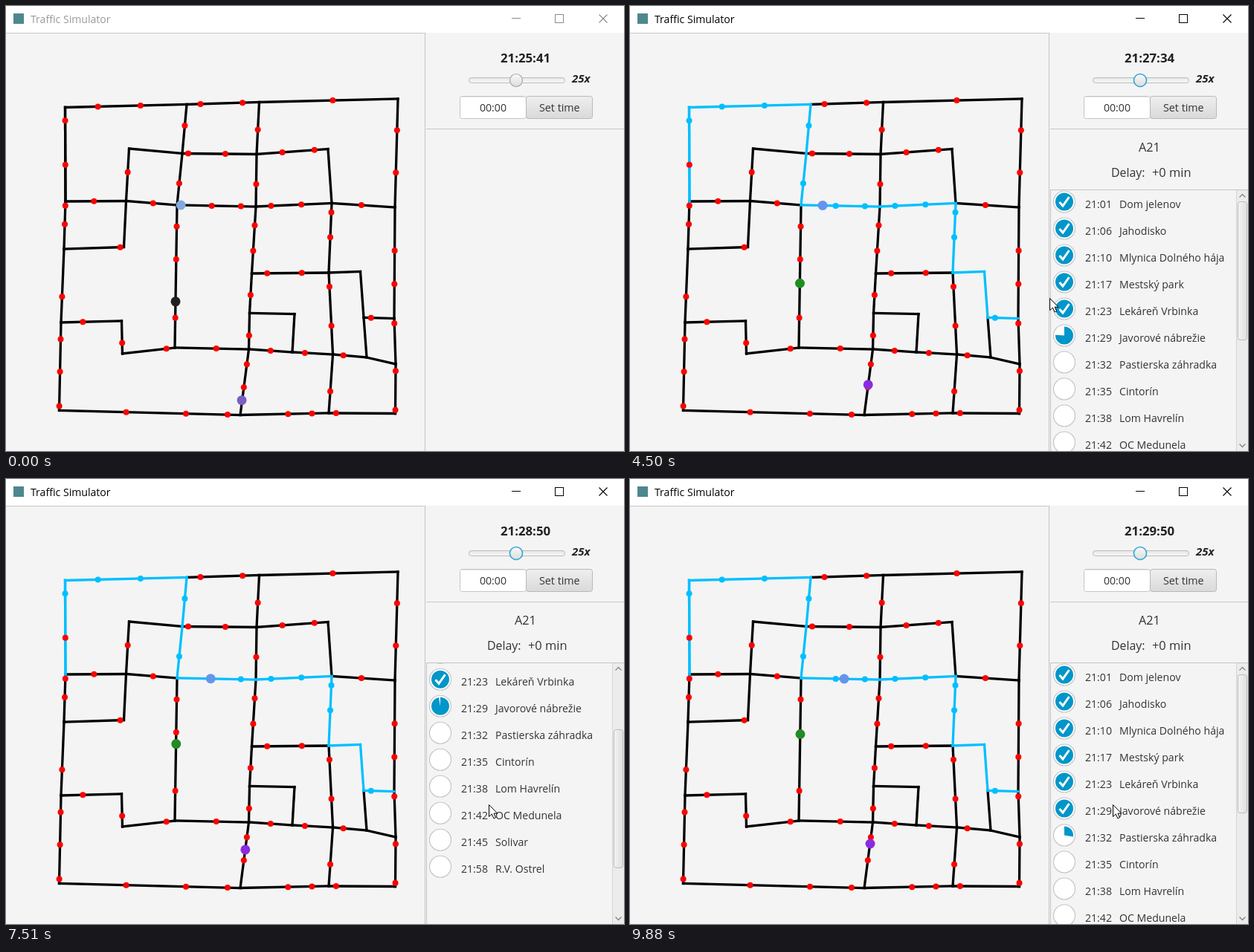
Animation, 831 px wide and 599 px high, one loop 9960 ms. Source, as an HTML page with a canvas:

```html
<!DOCTYPE html>
<html lang="sk">
<head>
<meta charset="utf-8">
<title>Traffic Simulator</title>
<style>
html, body { margin: 0; width: 100%; height: 100%; overflow: hidden; background: #f4f4f4; }
canvas { display: block; }
</style>
</head>
<body>
<canvas id="stage" width="831" height="599"></canvas>
<script>
const ctx = document.getElementById('stage').getContext('2d');
const LOOP = 9960, SELECT = 2500, RATE = 25.287;
const toSeconds = (h, m, s = 0) => h * 3600 + m * 60 + s;
const START = toSeconds(21, 25, 41);

const lerp = (a, b, k) => a.map((v, i) => v + (b[i] - v) * k);
const ramp = (t, from, to) => Math.min(1, Math.max(0, (t - from) / (to - from)));

const junctions = {
  a: [79.5, 136.5], b: [243, 132.5], c: [340.5, 129.5], d: [527, 125],
  e: [165.5, 192], f: [237, 198.5], g: [337, 199.5], h: [433, 192.5],
  i: [80, 263], j: [161.5, 262.5], k: [230, 268], l: [336, 270], m: [438, 265.5], n: [523, 271],
  o: [78, 327], p: [158.5, 324.5], q: [330.5, 360], r: [434, 359], s: [476.5, 357.5],
  t: [327.5, 413.5], u: [388, 414.5], v: [481, 419.5], w: [522, 420.5], x: [74, 426], y: [155.5, 424],
  z: [156.5, 468], A: [227, 460], B: [326.5, 462], C: [385, 466], D: [439.5, 469], E: [485, 473], F: [524, 482],
  G: [71.5, 544.5], H: [315, 550.5], I: [434, 548], J: [523.5, 548.5],
};

// Letters are junctions; numbers between them are stops, in percent of that block.
// Stops serve only the direction in which the street is written.
const streets = [
  'a 27 62 b 19 77 c 53 d',
  'd 29 68 n 39 69 w 11 F 14 93 J',
  'G 37 70 93 H 54 81 I 11 J',
  'a 61 i 9 48 o 65 x 19 56 95 G',
  'i 86 a',
  'i 47 j 53 k 44 81 l 20 60 m 47 n',
  'e f 8 58 g 36 81 h m',
  'e 45 j p 6 o',
  'b 43 f 58 k 15 38 79 A',
  'c 53 g 57 l 28 66 q 54 t 62 B 23 58 H',
  'q 20 65 r s v 24 w',
  'm 13 49 r 17 65 D 63 I',
  'v E',
  't u C',
  'x 36 y 67 z 84 A 56 B 50 C 31 D 31 E F',
];
const route = 'iabfklmrsvw';

const blocks = streets.flatMap(street =>
  [...street.matchAll(/([a-z])([\d ]+)(?=([a-z]))/gi)].map(([, from, stops, to]) => {
    const ends = [junctions[from], junctions[to]];
    const served = route.includes(from + to);
    return {
      ends, served,
      onRoute: served || route.includes(to + from),
      stops: (stops.match(/\d+/g) || []).map(percent => lerp(...ends, percent / 100)),
    };
  }));

const timetable = [
  '21:01 Dom jelenov', '21:06 Jahodisko', '21:10 Mlynica Dolného hája', '21:17 Mestský park',
  '21:23 Lekáreň Vrbinka', '21:29 Javorové nábrežie', '21:32 Pastierska záhradka', '21:35 Cintorín',
  '21:38 Lom Havrelín', '21:42 OC Medunela', '21:45 Solivar', '21:58 R.V. Ostrel',
].map(row => {
  const time = row.slice(0, 5);
  return { time, name: row.slice(6), at: toSeconds(...time.split(':').map(Number)) };
});

// The simulation pauses briefly while the selection is built.
const elapsedAt = t => 0.6 + RATE / 1000 * (Math.min(t, SELECT) + Math.max(0, t - SELECT - 56));

const scrollAt = t => 250 * ramp(t, 5440, 6690) * (1 - ramp(t, 7077, 8761)) ** 2;

function cursorAt(t) {
  const enter = lerp([290, 600], [262, 290], 1 - (1 - ramp(t, 150, 1500)) ** 2);
  const click = lerp(enter, [249, 268], ramp(t, 1700, 2400));
  const toList = lerp(click, [564, 393], ramp(t, 3150, 4500));
  return lerp(toList, [649, 438], ramp(t, 4500, 5000));
}

function text(str, x, y, size = 14.1, color = '#333', style = '') {
  ctx.font = `${style} ${size}px "Open Sans", "Noto Sans", sans-serif`;
  ctx.fillStyle = color;
  ctx.fillText(str, x, y);
}

function rect(x, y, w, h, fill) {
  ctx.fillStyle = fill;
  ctx.fillRect(x, y, w, h);
}

function line(pts, color, width) {
  ctx.beginPath();
  pts.forEach(p => ctx.lineTo(...p));
  ctx.strokeStyle = color;
  ctx.lineWidth = width;
  ctx.stroke();
}

function paint(fill, stroke, width = 1) {
  ctx.fillStyle = fill;
  ctx.fill();
  if (!stroke) return;
  ctx.strokeStyle = stroke;
  ctx.lineWidth = width;
  ctx.stroke();
}

function disc([x, y], r, fill, stroke, width) {
  ctx.beginPath();
  ctx.arc(x, y, r, 0, 2 * Math.PI);
  paint(fill, stroke, width);
}

function box(x, y, w, h, r, fill, stroke) {
  ctx.beginPath();
  ctx.roundRect(x, y, w, h, r);
  paint(fill, stroke);
}

function shade(x0, y0, x1, y1, from, to) {
  const g = ctx.createLinearGradient(x0, y0, x1, y1);
  g.addColorStop(0, from);
  g.addColorStop(1, to);
  return g;
}

function drawTitleBar(active) {
  const ink = active ? '#000' : '#8a8a8a';
  rect(0, 0, 831, 36, '#fff');
  rect(0, 36, 564, 1, '#c8c8c8');
  rect(10, 10, 14, 14, '#4d8790');
  text('Traffic Simulator', 33, 23, 14.1, active ? '#000' : '#999');
  line([[680, 16.5], [692, 16.5]], ink, 1);
  ctx.strokeRect(738.5, 11.5, 11, 11);
  line([[797.5, 11.5], [808.5, 22.5]], ink, 1.1);
  line([[808.5, 11.5], [797.5, 22.5]], ink, 1.1);
}

function drawMap(t, elapsed, selected) {
  const color = (hot, base) => selected && hot ? '#00bfff' : base;
  ctx.lineCap = 'square';
  for (const hot of [false, true])
    blocks.filter(b => b.onRoute === hot).forEach(b => line(b.ends, color(hot, '#000'), 3.3));
  ctx.lineCap = 'butt';
  blocks.forEach(b => b.stops.forEach(stop => disc(stop, 4, color(b.served, '#f00'))));

  const p = elapsed / 249;
  const palette = t < 30 ? ['#82aadc', '#231f20', '#7a5fc4'] : ['#6495ed', '#228b22', '#8a2be2'];
  [
    lerp([235, 268], [288, 269], p),
    lerp([228, 398], [229, 343.5], p),
    lerp([317, 531], [323, 491], p ** 0.8),
  ].forEach((at, i) => disc(at, 6.5, palette[i]));
}

function drawControls(now, active) {
  const clock = [now / 3600, now / 60 % 60, now % 60]
    .map(n => String(Math.floor(n)).padStart(2, '0')).join(':');
  rect(563, 36, 1, 563, '#c4c4c4');
  rect(565, 165, 266, 1, '#c8c8c8');
  text(clock, 665, 76, 16.8, '#222', 'bold');
  text('25x', 761, 103, 15, '#222', 'italic bold');
  box(622.5, 96.5, 129, 7, 3.5, shade(0, 96, 0, 104, '#e4e4e4', '#fafafa'), '#bcbcbc');
  disc([686, 100], 8.5, shade(0, 91, 0, 109, '#fafafa', '#dcdcdc'), active ? '#35aad6' : '#a8a8a8', active ? 1.7 : 1.2);
  box(610.5, 121.5, 89, 30, 3, '#fff', '#c4c4c4');
  rect(612, 122, 86, 1, '#e4e4e4');
  text('00:00', 637, 142);
  box(699.5, 121.5, 89, 30, 3, shade(0, 121, 0, 152, '#efefef', '#d9d9d9'), '#b8b8b8');
  text('Set time', 717, 142, 14.3);
}

function drawProgress(x, y, done) {
  disc([x, y], 14.5, '#fff', '#c6c6c6', 1.2);
  if (done <= 0) return;
  ctx.beginPath();
  ctx.moveTo(x, y);
  ctx.arc(x, y, 12, -Math.PI / 2, (2 * Math.min(done, 1) - 0.5) * Math.PI);
  paint('#0096c9');
  if (done >= 1) line([[x - 6.5, y + 0.5], [x - 2, y + 5.5], [x + 6.5, y - 6.5]], '#fff', 3);
}

function drawTimetable(now, scroll) {
  text('A21', 684, 196, 16.3);
  text('Delay:', 647, 230, 15.9);
  text('+0 min', 702, 230, 16.4);
  rect(565, 247, 266, 1, '#c4c4c4');
  rect(565, 247, 1, 352, '#c4c4c4');

  ctx.save();
  ctx.beginPath();
  ctx.rect(566, 248, 249, 351);
  ctx.clip();
  timetable.forEach((stop, i) => {
    const y = 263.5 + 36 * i - scroll;
    const prev = i ? timetable[i - 1].at : 0;
    drawProgress(584, y, (now - prev) / (stop.at - prev));
    text(stop.time, 612, y + 8.5);
    text(stop.name, 658, y + 8.5);
  });
  ctx.restore();

  rect(815, 248, 16, 351, '#ececec');
  rect(815, 248, 1, 351, '#d4d4d4');
  line([[819.5, 257.5], [823.5, 253.5], [827.5, 257.5]], '#888', 1.4);
  line([[819.5, 589.5], [823.5, 593.5], [827.5, 589.5]], '#888', 1.4);
  box(817.5, 263.5 + scroll * 0.536, 12, 186, 3, shade(817, 0, 830, 0, '#f4f4f4', '#dedede'), '#bababa');
}

function drawCursor([x, y]) {
  const shape = [[0, 0], [0, 16], [3.8, 12.6], [6.4, 18.4], [9, 17.2], [6.5, 11.6], [11.3, 11.6]];
  ctx.beginPath();
  shape.forEach(([dx, dy]) => ctx.lineTo(x + dx + 0.5, y + dy + 0.5));
  ctx.closePath();
  paint('#fff', '#000');
}

function draw() {
  const t = performance.now() % LOOP;
  const selected = t >= SELECT;
  const elapsed = elapsedAt(t);
  const now = START + elapsed;

  rect(0, 0, 831, 599, '#f4f4f4');
  drawTitleBar(selected);
  drawMap(t, elapsed, selected);
  drawControls(now, selected);
  if (selected) drawTimetable(now, scrollAt(t));
  drawCursor(cursorAt(t));
  requestAnimationFrame(draw);
}
draw();
</script>
</body>
</html>
```
